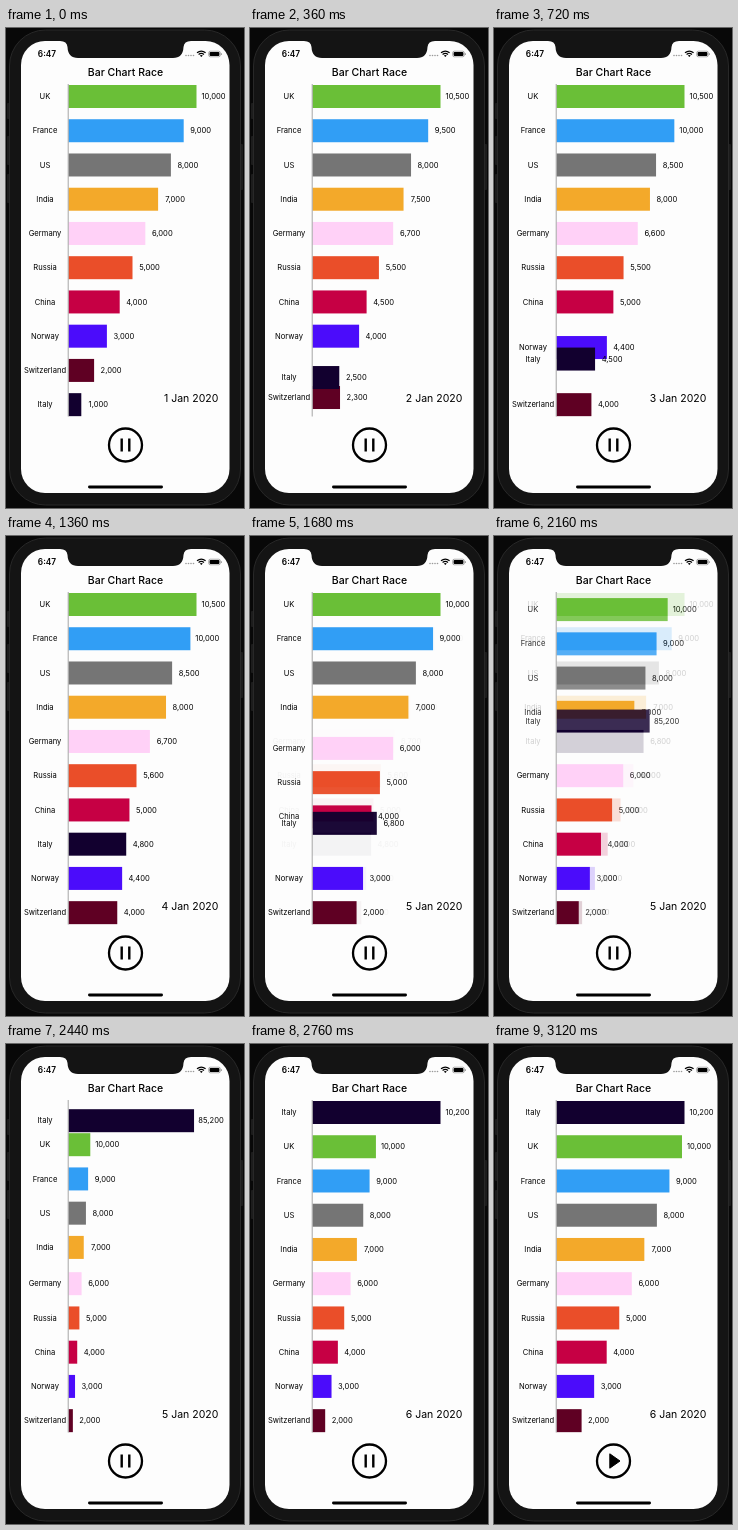
Animation, 238 px wide and 480 px high, one loop 3840 ms. Source, as an HTML page:

```html
<!DOCTYPE html>
<html lang="en">
<head>
<meta charset="utf-8">
<title>Bar Chart Race</title>
<style>
  html, body { margin: 0; width: 100%; height: 100%; overflow: hidden; background: #080808; }
  svg { display: block; width: 238px; height: 480px; }
  text { font-family: Inter, Roboto, "Liberation Sans", sans-serif; fill: #000; }
  .row text { font-size: 7.6px; text-anchor: middle; }
  .head { font-size: 10.5px; font-weight: 500; text-anchor: middle; }
  .date { font-size: 10.5px; text-anchor: end; }
  .clock { font-size: 8.3px; font-weight: 600; text-anchor: middle; }
</style>
</head>
<body>
<svg viewBox="0 0 238 480">
  <!-- phone body -->
  <rect width="238" height="480" fill="#080808"/>
  <g fill="#1c1c1c">
    <rect x="1" y="75" width="4" height="16" rx="1"/>
    <rect x="1" y="108" width="4" height="29" rx="1"/>
    <rect x="1" y="146" width="4" height="29" rx="1"/>
    <rect x="233" y="116" width="4" height="46" rx="1"/>
  </g>
  <rect x="3.5" y="2" width="231" height="475" rx="36" fill="#141414" stroke="#282828"/>
  <rect x="15" y="13" width="208.5" height="452" rx="24" fill="#fdfdfd"/>
  <path d="M54 12.5H185V13Q178 13 177.5 19Q177 30 167 30H72Q62 30 61.500 19Q61 13 54 13Z" fill="#141414"/>

  <!-- status bar -->
  <text class="clock" x="41" y="29">6:47</text>
  <g fill="#999">
    <circle cx="180" cy="27.500" r=".8"/><circle cx="182.500" cy="27.500" r=".8"/>
    <circle cx="185" cy="27.500" r=".8"/><circle cx="187.500" cy="27.500" r=".8"/>
  </g>
  <path d="M191 24.800Q195.300 21.300 199.600 24.800M192.600 26.500Q195.300 24.300 198 26.500" fill="none" stroke="#000" stroke-width="1.200"/>
  <path d="M193.800 27.500Q195.300 26.300 196.800 27.500L195.300 29Z"/>
  <rect x="202.700" y="23.200" width="11.600" height="5.600" rx="1.600" fill="none" stroke="#777" stroke-width=".6"/>
  <rect x="203.600" y="24" width="9.800" height="4" rx=".9"/>
  <rect x="215" y="25" width=".8" height="2" rx=".4" fill="#777"/>

  <text class="head" x="119.500" y="48">Bar Chart Race</text>
  <g id="before"></g>
  <g id="now"></g>
  <rect x="61.700" y="56" width="1" height="332.500" fill="#a5a5a5"/>
  <text class="date" id="date" x="212.300" y="374"></text>

  <!-- controls -->
  <circle cx="119.500" cy="417" r="16.500" fill="none" stroke="#000" stroke-width="2.300"/>
  <path id="pause" d="M115.700 410.500V423.500M123.300 410.500V423.500" stroke="#000" stroke-width="2.400"/>
  <path id="play" d="M115.800 409.800L126 417L115.800 424.200Z" stroke="#000" stroke-linejoin="round"/>
  <rect x="82" y="457.600" width="75" height="2.900" rx="1.450"/>
</svg>
<script>
const LOOP = 3840, STEP = 40, LAST = 3120;
const START = 18, PERIOD = 502, MOVE = 500, FADE = 0.325, STOP = 3030;
const LEFT = 62.5, FULL = 128, TOP = 68.4, PITCH = 34.24;

const countries = [
  ["UK", "#6abf37"], ["France", "#319ef5"], ["US", "#757575"], ["India", "#f3a92a"],
  ["Germany", "#ffd1f7"], ["Russia", "#ea4e29"], ["China", "#c60044"],
  ["Norway", "#4b0cfb"], ["Switzerland", "#5f0023"], ["Italy", "#12002f"]
];
// Day of January, then values in hundreds
const table = [
  [1, 100, 90, 80, 70, 60, 50, 40, 30, 20, 10],
  [2, 105, 95, 80, 75, 67, 55, 45, 40, 23, 25],
  [3, 105, 100, 85, 80, 66, 55, 50, 44, 40, 45],
  [4, 105, 100, 85, 80, 67, 56, 50, 44, 40, 48],
  [5, 100, 90, 80, 70, 60, 50, 40, 30, 20, 68],
  [5, 100, 90, 80, 70, 60, 50, 40, 30, 20, 852],
  [6, 100, 90, 80, 70, 60, 50, 40, 30, 20, 102]
];
const states = table.map(([day, ...values]) => {
  const max = Math.max(...values);
  return {
    day,
    bars: values.map(v => ({
      label: (v * 100).toLocaleString("en-US"),
      y: TOP + PITCH * values.filter(o => o > v).length,
      w: FULL * v / max
    }))
  };
});

const $ = id => document.getElementById(id);
const clamp = x => Math.min(1, Math.max(0, x));
const mix = (a, b, p) => a + (b - a) * p;

function add(parent, tag, attrs, text = "") {
  const el = document.createElementNS("http://www.w3.org/2000/svg", tag);
  for (const key in attrs) el.setAttribute(key, attrs[key]);
  el.textContent = text;
  return parent.appendChild(el);
}

function makeChart(group) {
  add(group, "rect", { x: 16, y: 54, width: 207, height: 336, fill: "#fdfdfd" });
  return countries.map(([name, fill]) => {
    const row = add(group, "g", { class: "row" });
    const bar = add(row, "rect", { x: LEFT, y: -11.4, height: 23, fill });
    add(row, "text", { x: 39, y: 2.7 }, name);
    return { row, bar, value: add(row, "text", { y: 2.7 }) };
  });
}

function setChart(rows, from, to, p) {
  rows.forEach(({ row, bar, value }, i) => {
    const a = from.bars[i], b = to.bars[i], w = mix(a.w, b.w, p);
    row.setAttribute("transform", `translate(0 ${mix(a.y, b.y, p)})`);
    bar.setAttribute("width", w);
    value.setAttribute("x", LEFT + w + 17);
    value.textContent = b.label;
  });
}

// Cubic ease-in-out with handles at .42 and .58
function ease(x) {
  let lo = 0, hi = 1;
  for (let i = 0; i < 24; i++) {
    const u = (lo + hi) / 2;
    const bx = 3 * (1 - u) * (1 - u) * u * 0.42 + 3 * (1 - u) * u * u * 0.58 + u * u * u;
    if (bx < x) lo = u; else hi = u;
  }
  return lo * lo * (3 - 2 * lo);
}

const before = makeChart($("before")), now = makeChart($("now"));

function draw(time) {
  const t = Math.min(LAST, Math.floor(time % LOOP / STEP) * STEP);
  const k = Math.min(states.length - 2, Math.floor((t - START) / PERIOD));
  const from = states[Math.max(0, k)], to = states[k + 1];
  const s = k < 0 ? 1 : clamp((t - START - k * PERIOD) / MOVE);
  setChart(before, from, from, 0);
  setChart(now, from, to, s < 1 ? ease(s) : 1);
  $("now").setAttribute("opacity", clamp(s / FADE));
  $("date").textContent = `${to.day} Jan 2020`;
  const stopped = clamp((t - STOP) / (LAST - STOP));
  $("pause").setAttribute("opacity", 1 - stopped);
  $("play").setAttribute("opacity", stopped);
}

const origin = performance.now();
function tick() {
  draw(performance.now() - origin);
  requestAnimationFrame(tick);
}
tick();
</script>
</body>
</html>
```
